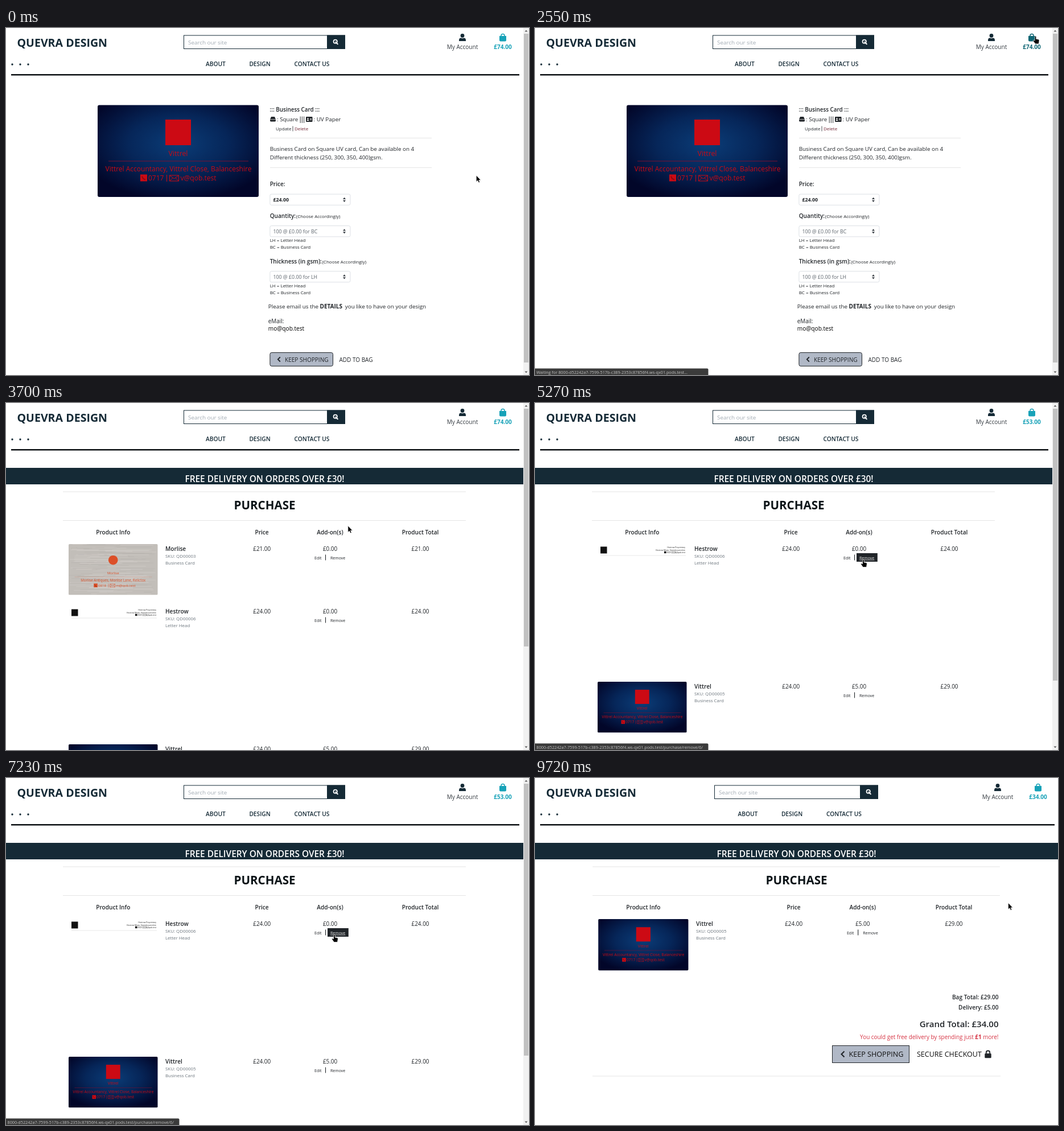
Recreate the animation shown at these times as an HTML page. Size 919 px wide and 610 px high, loop 9810 ms.

```html
<!DOCTYPE html>
<html lang="en">
<head>
<meta charset="utf-8">
<title>Shop bag</title>
<style>
html, body { margin: 0; width: 100%; height: 100%; overflow: hidden; background: #fff; }
svg { display: block; width: 919px; height: 610px; }
text { font-family: "Open Sans", sans-serif; white-space: pre; }
.bag { fill: #17a2b8; }
.bag.over { fill: #0f6674; }
</style>
</head>
<body>
<svg id="stage" viewBox="0 0 919 610" xmlns="http://www.w3.org/2000/svg"></svg>
<script>
const LOOP = 9810, INK = '#152a36', DARK = '#212529', GREY = '#6c757d', RED = '#cc0a14';
const stage = document.getElementById('stage');

// Drawing helpers
const text = (x, y, size, str, fill = DARK, weight = 400, anchor = 'start') =>
  `<text x="${x}" y="${y}" font-size="${size}" fill="${fill}" font-weight="${weight}" text-anchor="${anchor}">${str}</text>`;
const mid = (x, y, size, str, fill, weight) => text(x, y, size, str, fill, weight, 'middle');
const end = (x, y, size, str, fill, weight) => text(x, y, size, str, fill, weight, 'end');
const rect = (x, y, w, h, fill, more = '') =>
  `<rect x="${x}" y="${y}" width="${w}" height="${h}" fill="${fill}" ${more}/>`;
const path = (d, fill = 'none', more = '') => `<path d="${d}" fill="${fill}" ${more}/>`;
const line = (d, stroke, width = 1) => path(d, 'none', `stroke="${stroke}" stroke-width="${width}"`);
const at = (x, y, body, scale = 1) => `<g transform="translate(${x} ${y}) scale(${scale})">${body}</g>`;
const rule = (x1, x2, y) => line(`M${x1} ${y}H${x2}`, '#e5e5e5');

function header(w, price) {
  const wide = w - 909, sx = Math.round(w / 3 + 9), se = sx + (wide ? 288 : 284), nav = wide * .55;
  const user = at(802 + wide * 1.1, 10,
    `<circle cy="3.5" r="3.4" fill="${INK}"/>` + path('M-6 13V11.5Q-6 7.8 -2.6 7.6Q0 8.8 2.6 7.6Q6 7.8 6 11.5V13Z', INK));
  const bag = at(873 + wide * 1.1, 10,
    path('M-6 4H6V11.5Q6 13.5 4 13.5H-4Q-6 13.5 -6 11.5Z') .replace('fill="none"', '') +
    path('M-3 6V3.5A3 2.9 0 0 1 3 3.5V6', 'none', 'stroke="currentColor" stroke-width="1.5"') +
    mid(0, 26.5, 10.05, price, '', 700).replace('fill=""', ''));
  return text(19.5, 32.5, 19.6, 'QUEVRA DESIGN', INK, 700) +
    rect(sx + .5, 13, se - sx - 1, 23.5, '#fff', `stroke="${INK}"`) +
    rect(se - 32, 12.5, 32, 24.5, INK) +
    path(`M${se - 13.2} 28.2l-3.6-3.6`, 'none', 'stroke="#fff" stroke-width="2" stroke-linecap="round"') +
    `<circle cx="${se - 17.3}" cy="23.8" r="3.2" fill="none" stroke="#fff" stroke-width="1.7"/>` +
    text(sx + 8, 28.7, 9.85, 'Search our site', '#a3acb4') +
    user + mid(802 + wide * 1.1, 36.5, 10, 'My Account', '#343a40') +
    `<g class="bag" color="#17a2b8">${bag}</g>` +
    [11, 25, 39].map(x => `<circle cx="${x}" cy="64" r="1.7" fill="${INK}"/>`).join('') +
    mid(368.4 + nav, 67.3, 10.2, 'ABOUT', INK, 600) +
    mid(446 + nav, 67.3, 10.2, 'DESIGN', INK, 600) +
    mid(537.5 + nav, 67.3, 10.2, 'CONTACT US', INK, 600) +
    rect(9, 81, w - 16 + (wide ? 1 : 0), 2.5, '#0b0f12');
}

function scrollbar(bottom) {
  return rect(909, 0, 10, 610, '#f1f1f1') + rect(910, 10, 8, bottom - 10, '#c1c1c1') +
    path('M911.5 6.5L914 3.5L916.5 6.5ZM911.5 603.5L914 606.5L916.5 603.5Z', '#606060');
}

// Business card art, drawn in a 283 by 161.5 box
const envelope = (x, y, c, w = 16, h = 10) =>
  line(`M${x} ${y}h${w}v${h}h${-w}ZL${x + w / 2} ${y + h * .6}L${x + w} ${y}M${x} ${y + h}l${w * .36} ${-h * .55}M${x + w} ${y + h}l${-w * .36} ${-h * .55}`, c, w / 16);

const contact = (y, c, phone, mail, size) =>
  rect(75, y - 10.5, 12, 12, c) + line(`M78 ${y - 7.5}q1 5 6 6`, '#0004', 2) +
  text(89, y, size, phone, c) + line(`M121.5 ${y - 10}v12`, c) +
  envelope(126.5, y - 9, c) + text(145.5, y, size, mail, c);

const navyCard = rect(0, 0, 283, 161.5, 'url(#navy)', 'rx="3"') +
  rect(119, 25.5, 45, 45, RED) + mid(141.5, 89.5, 12.3, 'Vittrel', RED) +
  line('M19 98.5H265', '#7d1030') +
  mid(142, 116, 12, 'Vittrel Accountancy, Vittrel Close, Balanceshire', RED) +
  contact(132.5, RED, '0717', 'v@qob.test', 12);

let seed = 7;
const rnd = () => (seed = seed * 16807 % 2147483647) / 2147483647;
const grain = Array.from({ length: 130 }, () => {
  const len = 30 + rnd() * 120, x = rnd() * (283 - len), y = 1 + rnd() * 159;
  return line(`M${x.toFixed(1)} ${y.toFixed(1)}h${len.toFixed(1)}`, rnd() < .5 ? '#a59f9955' : '#dedad688', 1.2);
}).join('');
const ORANGE = '#dc4f28';
const woodCard = rect(0, 0, 283, 161.5, '#c2beb9', 'rx="3"') + grain +
  `<circle cx="141.5" cy="51" r="15" fill="${ORANGE}"/>` + mid(141.5, 96, 10.8, 'Morlise', ORANGE) +
  line('M19 104.5H265', '#dc4f2855') +
  mid(141.5, 120, 11.2, 'Morlise Antiques, Morlise Lane, Relictox', ORANGE) +
  at(5, 0, contact(136, ORANGE, '0818', 'm@qob.test', 11));

const letterHead = rect(5, 114, 11.5, 12, '#111') +
  end(154, 116, 3.4, 'Hestrow Proprietary', '#222') +
  end(154, 121, 3.4, 'Hestrow Mews, Estatebournshire', '#222') +
  rect(117, 122.3, 3.4, 3.4, '#111') + text(121, 125.6, 3.4, '0929', '#222') +
  line('M130.5 122v4', '#222', .5) + envelope(132, 122.6, '#222', 4.6, 3) +
  end(154, 125.6, 3.4, 'h@qob.test', '#222') + line('M5 129.5H155', '#e2e2e2', .8);

// First page
const select = (y, str, fill, weight) =>
  rect(463.9, y, 141, 19.2, '#fff', 'rx="2.5" stroke="#d9dde2" stroke-width=".9"') +
  text(469.5, y + 13, 8.8, str, fill, weight) +
  path(`M592 ${y + 8.8}l2.5-3.2l2.5 3.2ZM592 ${y + 10.6}l2.5 3.2l2.5-3.2Z`, '#343a40');

const choice = (y, label, noteX, str) =>
  text(463.7, y, 10.05, label, DARK, 600) + text(noteX, y, 8, '(Choose Accordingly)') +
  select(y + 14.1, str, '#5c646c') +
  text(463.7, y + 42.8, 8, 'LH = Letter Head') + text(463.7, y + 54.8, 8, 'BC = Business Card');

const product = header(909, '£74.00') + scrollbar(588) + at(161, 135.5, navyCard) +
  text(463.5, 146.5, 9.85, '::: Business Card :::', DARK, 600) +
  path('M466 156h6l2 4.5h-10ZM464 161.3h10v1.8q0 1.4-1.4 1.4h-7.2q-1.4 0-1.4-1.4Z', DARK) +
  text(476, 164.3, 9.8, ': Square') + line('M517.2 155.5v11.5M520.4 155.5v11.5M523.6 155.5v11.5', DARK, .9) +
  rect(527, 156, 11.5, 9, DARK, 'rx="1"') +
  path('M528.5 163q0-2 2-2t2 2ZM534 159h3v1h-3ZM534 161h3v1h-3ZM529.3 159.2a1.2 1.2 0 1 0 2.4 0a1.2 1.2 0 1 0-2.4 0Z', '#fff') +
  text(540.5, 164.3, 9.85, ': UV Paper') +
  text(474, 179.5, 8, 'Update') + line('M504 172.5v9', DARK, .8) + text(507, 179.5, 8, 'Delete', '#6f2232') +
  rule(464, 748, 193.5) +
  text(463.7, 216, 9.8, 'Business Card on Square UV card, Can be available on 4') +
  text(463.7, 231.3, 9.8, 'Different thickness (250, 300, 350, 400)gsm.') +
  rule(464, 748, 245.5) +
  text(463.7, 277.8, 10.05, 'Price:', DARK, 600) + select(292.1, '£24.00', DARK, 700) +
  choice(333.6, 'Quantity:', 509.8, '100 @ £0.00 for BC') +
  choice(413.5, 'Thickness (in gsm):', 555.5, '100 @ £0.00 for LH') +
  text(460.8, 493.3, 9.85, 'Please email us the ') + text(551.5, 493.3, 10, 'DETAILS', DARK, 700) +
  text(595.8, 493.3, 9.85, 'you like to have on your design') +
  text(460.8, 518.8, 9.9, 'eMail:') + text(460.8, 532, 10.1, 'mo@qob.test', '#000') +
  rect(463.9, 570.6, 110.6, 23.8, '#b0b8c6', `rx="3" stroke="${DARK}"`) +
  line('M481.8 578.5l-4 4l4 4', DARK, 1.8) +
  text(490, 586.5, 10.05, 'KEEP SHOPPING') + text(585.5, 586.5, 10, 'ADD TO BAG');

// Bag pages
const items = {
  wood: { art: woodCard, name: 'Morlise', sku: 3, kind: 'Business Card', price: '£21.00', extra: '£0.00', total: '£21.00' },
  letter: { art: letterHead, name: 'Hestrow', sku: 6, kind: 'Letter Head', price: '£24.00', extra: '£0.00', total: '£24.00', tall: 242 },
  navy: { art: navyCard, name: 'Vittrel', sku: 5, kind: 'Business Card', price: '£24.00', extra: '£5.00', total: '£29.00' }
};

function row(item, y, k) {
  const art = item.tall ? at(110 * k, y - 109.5, item.art, k) : at(110 * k, y, item.art, .553 * k);
  return art + text(280 * k, y + 11.8, 10.1, item.name, DARK, 600) +
    text(280 * k, y + 24, 7.9, 'SKU: QD0000' + item.sku, GREY) +
    text(280 * k, y + 36.2, 7.9, item.kind, GREY) +
    mid(449.7 * k, y + 11.6, 9.9, item.price) + mid(569.5 * k, y + 11.6, 9.9, item.extra) +
    mid(728 * k, y + 11.6, 9.9, item.total) +
    text(542 * k, y + 26.7, 7, 'Edit') + line(`M${561.5 * k} ${y + 18.5}v10`, DARK, 1.1) +
    text(570 * k, y + 26.7, 7, 'Remove');
}

function bagPage(w, price, names) {
  const k = w / 909, c = w / 2;
  let y = 248, out = header(w, price) + rect(0, 114, w, 29, INK) +
    mid(c, 139.2, 15.4, 'FREE DELIVERY ON ORDERS OVER £30!', '#fff', 600) +
    rule(100 * k, 808 * k, 156) + mid(c, 187, 20.6, 'PURCHASE', '#0c1418', 700) + rule(100 * k, 808 * k, 206.5);
  [[188.3, 'Product Info'], [449.6, 'Price'], [569.4, 'Add-on(s)'], [728, 'Product Total']]
    .forEach(([x, s]) => out += mid(x * k, 231.4, 10.1, s, DARK, 600));
  for (const n of names) {
    out += row(items[n], y, k);
    y += items[n].tall || 110;
  }
  return out + `<g class="remove">${rect(565 * k, 264, 36.8, 15, DARK)}${text(570 * k, 274.7, 7, 'Remove', '#e4e4e4')}` +
    line(`M${570 * k} 276h26.5`, '#e4e4e4', .7) + '</g>';
}

const totals = end(814.5, 389, 10.1, 'Bag Total: £29.00', DARK, 600) +
  end(814.5, 406.5, 10, 'Delivery: £5.00', DARK, 600) +
  end(814.5, 438, 15, 'Grand Total: £34.00', DARK, 600) +
  end(814.5, 458.6, 9.92, 'You could get free delivery by spending just <tspan font-weight="700">£1</tspan> more!', '#d63343') +
  rect(522.5, 470.5, 135, 30, '#b0b8c6', `stroke="${DARK}"`) +
  line('M543.5 480.5l-5 5l5 5', DARK, 2.1) +
  text(551.5, 490, 12.6, 'KEEP SHOPPING', '#111') + text(671, 490, 12.5, 'SECURE CHECKOUT', '#111') +
  rect(790.3, 484.3, 11.4, 8, DARK, 'rx="1.3"') + line('M792.8 485v-2.3a3.2 3.2 0 0 1 6.4 0V485', DARK, 1.8) +
  rule(101, 818, 524);

const pages = [
  [0, product],
  [2780, bagPage(909, '£74.00', ['wood', 'letter', 'navy']) + scrollbar(428)],
  [4960, bagPage(909, '£53.00', ['letter', 'navy']) + scrollbar(488)],
  [8070, bagPage(919, '£34.00', ['navy']) + totals]
];

stage.innerHTML = `<defs><radialGradient id="navy" cx=".5" cy=".42" r=".62">
  <stop offset="0" stop-color="#0b3d78"/><stop offset=".5" stop-color="#062659"/><stop offset="1" stop-color="#020629"/>
  </radialGradient></defs>` +
  pages.map(p => `<g class="page">${p[1]}</g>`).join('') +
  `<g id="status">${path('M0 598.5H302.5Q304.5 598.5 304.5 600.5V610H0Z', '#3b3b3b')}${text(2.5, 607.7, 7.24, '', '#c4c4c4')}</g>` +
  `<g id="pointer" stroke="#fff" stroke-width=".7">${path('M0 0V11.5L2.6 9.1L4.3 13L6.3 12.1L4.7 8.4H8Z', '#000')}` +
  path('M-1.3 1Q0-.9 1.3 1V5L5 5.6Q6.7 6.1 6.5 8L5.6 13.6H-.4L-4 8.6Q-4.5 6.8-2.9 7L-1.3 8Z', '#000') + '</g>';

// Pointer stops: time, x, y
const route = [
  [70, 826.3, 259], [220, 882.5, 57.5], [620, 882.5, 57.5], [720, 897, 42], [820, 903, 1], [980, 895, 50],
  [1180, 842, 84], [1340, 836, 109], [1600, 868, 62], [1760, 879, 36], [1920, 881, 14], [2150, 881, 14],
  [2250, 879.5, 14.3], [3060, 879.5, 14.3], [3300, 800, 90], [3550, 645, 192], [3700, 601, 215.5],
  [3850, 582, 260], [4030, 570, 302], [4110, 570, 302], [4350, 578, 275], [4500, 578, 275], [4590, 576.8, 275],
  [5450, 576.8, 275], [5700, 602, 290], [5960, 634, 306], [6050, 647, 313], [6250, 663, 314], [6550, 640, 326],
  [6920, 574, 284], [6980, 574, 284], [7070, 576.8, 275], [8380, 576.8, 275], [8500, 650, 215], [8620, 800, 110],
  [8720, 917.3, 38], [8800, 960, 10], [9060, 940, 40], [9180, 903, 75], [9350, 896, 8], [9400, 896, 8],
  [9500, 845, 120], [9600, 763, 229], [9720, 831.5, 219.5], [LOOP, 831.5, 219.5]
];
const host = '8000-d52242a7-7599-517b-c389-2353c87856f4.ws-qx01.pods.test';
const link = host + '/purchase/';
// Status line: on, off, fade length, words
const notes = [
  [1850, 2550, 0, link], [2550, 2780, 0, `Waiting for ${host}...`], [2780, 3160, 200, link],
  [4550, 5200, 0, link + 'remove/3/'], [5200, 5960, 140, link + 'remove/6/'],
  [7230, 8160, 0, link + 'remove/6/'], [8160, 8870, 150, link + 'remove/5/']
];

const views = [...stage.querySelectorAll('.page')];
const bags = [...stage.querySelectorAll('.bag')];
const removes = [...stage.querySelectorAll('.remove')];
const status = document.getElementById('status'), words = status.querySelector('text');
const pointer = document.getElementById('pointer'), [arrow, hand] = pointer.children;
const show = (el, on) => { el.style.display = on ? '' : 'none'; };

function place(t) {
  const i = route.findIndex(p => p[0] > t);
  if (i < 1) return route[0].slice(1);
  const [t0, x0, y0] = route[i - 1], [t1, x1, y1] = route[i], u = (t - t0) / (t1 - t0);
  return [x0 + (x1 - x0) * u, y0 + (y1 - y0) * u];
}

function draw(t) {
  const now = pages.filter(p => p[0] <= t).length - 1, wide = now === 3 ? 11 : 0;
  const [x, y] = place(t);
  const onBag = Math.abs(x - 873 - wide) < 16 && y > 9 && y < 40;
  const onRemove = now > 0 && x > 565 && x < 607 && y > 264 && y < 279;
  views.forEach((v, i) => show(v, i === now));
  bags.forEach(b => {
    b.classList.toggle('over', onBag);
    b.setAttribute('color', onBag ? '#0f6674' : '#17a2b8');
  });
  removes.forEach(r => show(r, onRemove));
  pointer.setAttribute('transform', `translate(${x.toFixed(2)} ${y.toFixed(2)})`);
  show(arrow, !onBag && !onRemove);
  show(hand, onBag || onRemove);
  const note = notes.find(n => t >= n[0] && t < n[1] + n[2]);
  show(status, note);
  if (note) {
    words.textContent = note[3];
    status.setAttribute('opacity', t < note[1] ? 1 : 1 - (t - note[1]) / note[2]);
  }
}

const start = performance.now();
function tick() {
  draw((performance.now() - start) % LOOP);
  requestAnimationFrame(tick);
}
tick();
</script>
</body>
</html>
```
